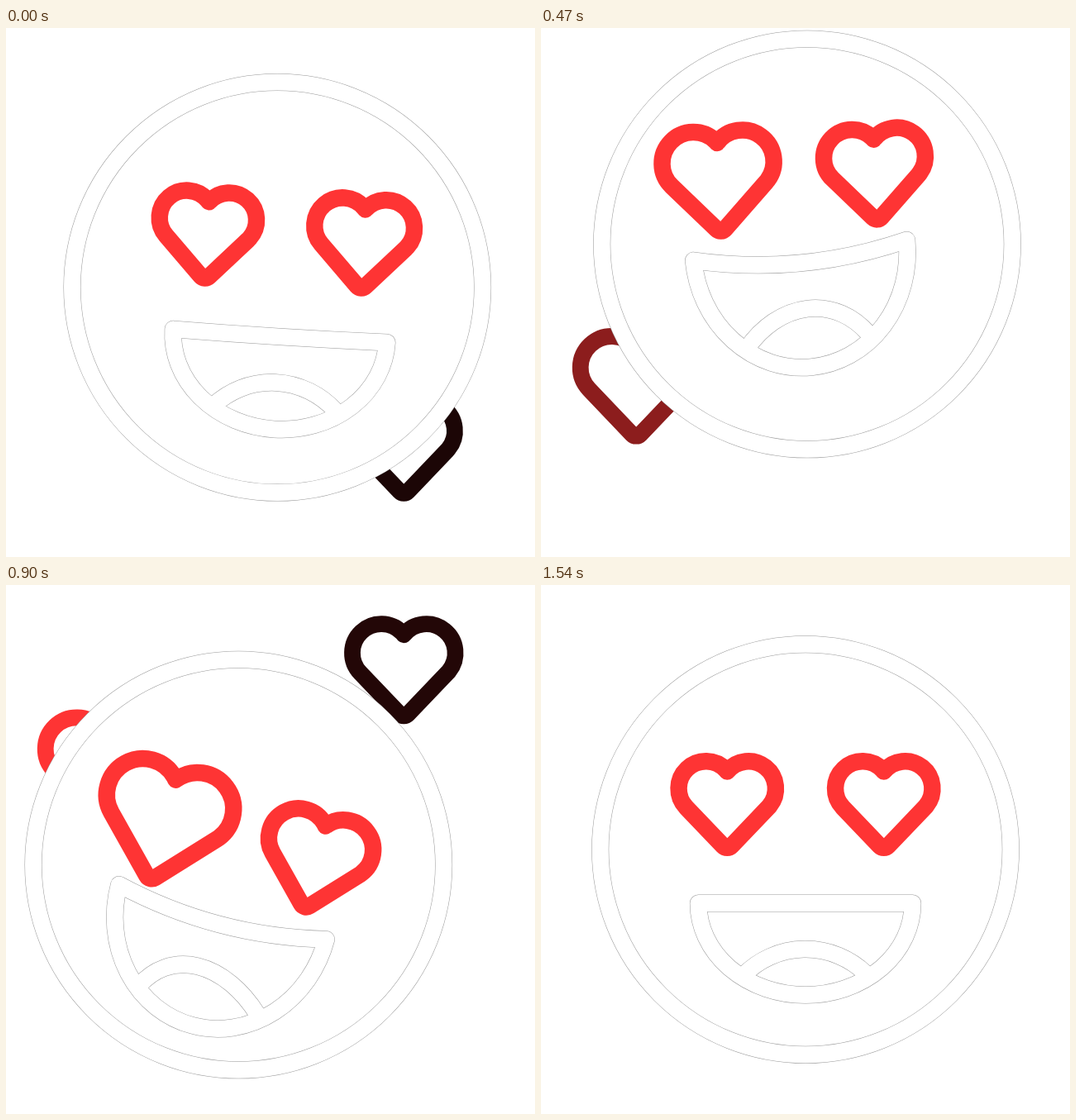
These frames come from a looping animation (640x640 px, 1710 ms). An HTML page with a canvas:

```html
<!DOCTYPE html>
<html lang="en">
<head>
<meta charset="utf-8">
<title>Heart eyes</title>
<style>
  html, body { margin: 0; width: 100%; height: 100%; overflow: hidden; background: #fff; }
  canvas { display: block; width: 640px; height: 640px; }
</style>
</head>
<body>
<canvas id="stage" width="640" height="640"></canvas>
<script>
const ctx = document.getElementById('stage').getContext('2d');
const LOOP = 1710;
const LAST_STEP = 45;
const PULSE = 15;
const LINE = 20.5;
const HAIR = 0.5;
const RED = [254, 52, 52];

const rad = degrees => degrees * Math.PI / 180;
const clamp = (v, lo = 0, hi = 1) => Math.max(lo, Math.min(hi, v));
const ease = v => { const u = clamp(v); return u * u * (3 - 2 * u); };

// Key points of the head's path around the centre: [step, x, y]
const HEAD = [
  [0, 8.3, -6.2], [8, 39.2, -39], [12, 2, -58.5], [16, -34.7, -33.2],
  [20.5, -53.5, -5], [25, -38.7, 18.5], [31, -12, 8.2], [36, 0, 0]
];

// Steps last 30 ms; the first one and the middle of each pulse are held longer
const startOf = n => n && 30 * n + 70 + 40 * Math.floor((n + 7) / PULSE);

function stepAt(ms) {
  let n = LAST_STEP;
  while (startOf(n) > ms + 0.5) n--;
  return n;
}

// Smooth curve through the keys, coming to rest at the last one
function follow(keys, n) {
  const last = keys.length - 1;
  if (n >= keys[last][0]) return keys[last].slice(1);
  const i = keys.findIndex(key => key[0] > n) - 1;
  const span = keys[i + 1][0] - keys[i][0], u = (n - keys[i][0]) / span, v = 1 - u;
  const slope = (k, c) => {
    if (k === last) return 0;
    const p = keys[Math.max(0, k - 1)], q = keys[k + 1];
    return (q[c] - p[c]) / (q[0] - p[0]);
  };
  return [1, 2].map(c => keys[i][c] * (1 - ease(u)) + keys[i + 1][c] * ease(u)
    + span * u * v * (slope(i, c) * v - slope(i + 1, c) * u));
}

// The features glide outwards, then spiral back to the middle of the face
function gaze(n) {
  const u = clamp((n - 8) / 23);
  const radius = 54 * clamp((n + 1.5) / 9.5) * (1 - u) ** 1.15;
  const angle = rad(-37.5 - 210 * (1 - (1 - u) ** 2));
  return [radius * Math.cos(angle), radius * Math.sin(angle)];
}

function poseAt(n) {
  const live = ease((n + 3) / 10) * (1 - ease((n - 37) / 8));
  const beat = 2 * Math.PI * n / PULSE;
  return {
    tilt: 14.4 * live * Math.cos(rad(20 * (clamp(n, 7, 37) - 7))),
    open: 31 * ease((n + 1.5) / 9) * (1 - ease((n - 29) / 8)),
    left: 1 + 0.325 * Math.min(1, 0.675 * (1 - Math.cos(beat))),
    right: 1 + live * (0.105 + 0.06 * Math.cos(2 * beat) - 0.03 * Math.cos(beat))
  };
}

function heart(x, y, size, color, width) {
  const lean = rad(46.3), notch = Math.asin(20.7 / 33);
  const lobeX = 25.7 * size, lobeY = -17.7 * size, r = 33 * size;
  ctx.beginPath();
  ctx.arc(x + lobeX, y + lobeY, r, Math.PI + notch, Math.PI / 2 - lean);
  ctx.arcTo(x, y + 57 * size, x - 20 * size, y + 36.1 * size, 7);
  ctx.arc(x - lobeX, y + lobeY, r, Math.PI / 2 + lean, -notch);
  ctx.closePath();
  ctx.lineWidth = width;
  ctx.lineJoin = 'round';
  ctx.strokeStyle = color;
  ctx.stroke();
}

// White bands with a hairline around their joined outline
function bands(...paths) {
  for (const [color, width] of [['#999', LINE + HAIR], ['#fff', LINE - HAIR]]) {
    ctx.strokeStyle = color;
    ctx.lineWidth = width;
    paths.forEach(path => ctx.stroke(path));
  }
}

// Fades from black to red and back while floating up
function risingHeart(x, y) {
  const glow = Math.min(clamp((525 - y) / 170), clamp((y - 86) / 110));
  if (glow < 0.09) return;
  const color = `rgb(${RED.map(v => Math.round(v * glow)).join()})`;
  heart(x, y, 1 + 0.15 * Math.min(1, 3 * glow), color, 19.8);
}

function drawHead() {
  const ring = new Path2D();
  ring.arc(0, 0, 248.3, 0, 2 * Math.PI);
  ctx.fillStyle = '#fff';
  ctx.fill(ring);
  bands(ring);
}

function drawMouth({ tilt, open }) {
  const half = 129.6, depth = 111 + open, stretch = depth / 111;
  const turn = 0.2 * tilt - 0.08 * open;
  const lips = new Path2D();
  lips.ellipse(0, 0, half, depth, 0, 0, Math.PI);
  lips.quadraticCurveTo(0, open, half, 0);
  lips.closePath();

  // An open mouth lets the tongue lean against the tilt
  const arch = new Path2D(), tongue = new Path2D();
  arch.ellipse(0, 160.5 * stretch, 104.9, 104.9 * stretch, 0, rad(-136), rad(-44));
  const shear = Math.tan(rad(tilt + turn)) * open / 31;
  tongue.addPath(arch, new DOMMatrix([1, 0, shear, 1, -shear * 87 * stretch, 0]));

  ctx.save();
  ctx.translate(0, 65 - open / 2);
  ctx.rotate(rad(turn));
  ctx.lineJoin = 'round';
  bands(lips, tongue);
  ctx.restore();
}

function drawEyes({ open, left, right }) {
  const color = `rgb(${RED.join()})`, y = open / 2 - 56;
  heart(-94.75, y, left, color, LINE);
  heart(94.75, y, right, color, LINE);
}

function draw(now) {
  const n = stepAt(now % LOOP), pose = poseAt(n);
  ctx.fillStyle = '#fff';
  ctx.fillRect(0, 0, 640, 640);

  risingHeart(481.3, 506 - 16.2 * n);
  risingHeart(115.2, 496.7 - 16.35 * (n - 8));

  ctx.save();
  ctx.translate(320, 320);
  ctx.translate(...follow(HEAD, n));
  drawHead();
  ctx.translate(...gaze(n));
  ctx.rotate(rad(pose.tilt));
  drawMouth(pose);
  drawEyes(pose);
  ctx.restore();
  requestAnimationFrame(draw);
}
draw(0);
</script>
</body>
</html>
```
